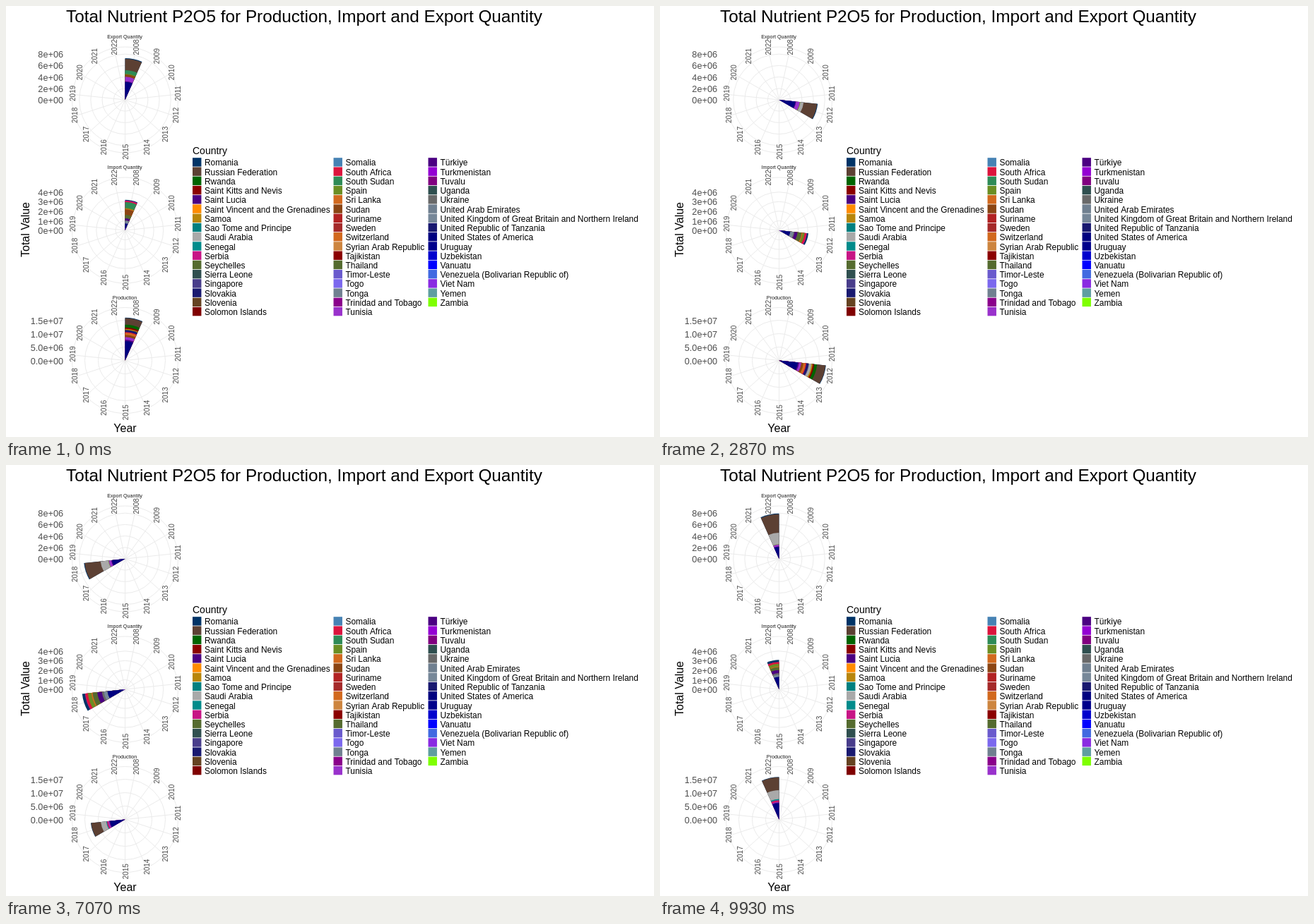
Animation, 917 px wide and 611 px high, one loop 10000 ms. Source, as an HTML page with a canvas:

```html
<!DOCTYPE html>
<html lang="en">
<head>
<meta charset="utf-8">
<title>Total Nutrient P2O5</title>
<style>
html, body { margin: 0; width: 100%; height: 100%; overflow: hidden; background: #fff; }
canvas { display: block; width: 917px; height: 611px; }
</style>
</head>
<body>
<canvas id="stage" width="917" height="611"></canvas>
<script>
const ctx = document.getElementById('stage').getContext('2d');
const LOOP = 10000, TICKS = 150;
const FIRST_YEAR = 2008, YEARS = 15, LAST = YEARS - 1;
const STEP = Math.PI * 2 / YEARS;
const CX = 168.5, RING = 75, KEY = 13.23;
const ARRIVAL = 4;
const GREY = '#4d4d4d';
const FONT = '"Liberation Sans", Arial, sans-serif';

const LEGEND = [
  { x: 264, rows: `Romania #003366|Russian Federation #5c4033|Rwanda darkgreen|Saint Kitts and Nevis darkred|Saint Lucia indigo|Saint Vincent and the Grenadines darkorange|Samoa darkgoldenrod|Sao Tome and Principe teal|Saudi Arabia darkgray|Senegal darkcyan|Serbia mediumvioletred|Seychelles darkolivegreen|Sierra Leone darkslategray|Singapore darkslateblue|Slovakia midnightblue|Slovenia #654321|Solomon Islands maroon` },
  { x: 463.5, rows: `Somalia steelblue|South Africa crimson|South Sudan seagreen|Spain olivedrab|Sri Lanka chocolate|Sudan saddlebrown|Suriname firebrick|Sweden brown|Switzerland chocolate|Syrian Arab Republic peru|Tajikistan darkred|Thailand darkolivegreen|Timor-Leste slateblue|Togo mediumslateblue|Tonga slategray|Trinidad and Tobago darkmagenta|Tunisia darkorchid` },
  { x: 597.5, rows: `Türkiye indigo|Turkmenistan darkviolet|Tuvalu purple|Uganda darkslategray|Ukraine dimgray|United Arab Emirates slategray|United Kingdom of Great Britain and Northern Ireland lightslategray|United Republic of Tanzania midnightblue|United States of America navy|Uruguay darkblue|Uzbekistan mediumblue|Vanuatu blue|Venezuela (Bolivarian Republic of) royalblue|Viet Nam blueviolet|Yemen cadetblue|Zambia chartreuse` }
];
const COLORS = {};
for (const col of LEGEND) {
  col.names = col.rows.split('|').map(row => {
    const cut = row.lastIndexOf(' ');
    const name = row.slice(0, cut);
    COLORS[name] = row.slice(cut + 1);
    return name;
  });
}

const USA = 'United States of America';
const UK = 'United Kingdom of Great Britain and Northern Ireland';

// size: key points of the bar length by year index.
// shares: [first year, last year]; a zero end means the country drops out or arrives midway.
const PANELS = [
  {
    title: 'Export Quantity', cy: 133, gap: 16.2, drop: 4,
    ticks: ['0e+00', '2e+06', '4e+06', '6e+06', '8e+06'],
    size: { 0: 59, 3: 61.5, 4: 55, 8: 53, 10: 58.5, 11: 66.5, 14: 64.2 },
    shares: {
      'Romania': [1, 1], 'Russian Federation': [16.5, 26], 'Saudi Arabia': [0, 16],
      'South Sudan': [5, 0], 'Spain': [1, 0.5], 'Sudan': [3.5, 0],
      'Tunisia': [6.5, 2.5], 'Türkiye': [1, 1], [USA]: [26, 16.5]
    }
  },
  {
    title: 'Import Quantity', cy: 318, gap: 13.55, drop: 4,
    ticks: ['0e+00', '1e+06', '2e+06', '3e+06', '4e+06'],
    size: { 0: 43.3, 2: 48.7, 4: 41.7, 8: 55.5, 9: 63, 12: 57, 14: 41.8 },
    shares: {
      'Romania': [1, 4], 'Serbia': [1, 0.5], 'South Africa': [1.5, 3], 'South Sudan': [8, 0],
      'Spain': [1.5, 5], 'Sri Lanka': [1, 1.5], 'Sudan': [8, 0], 'Thailand': [5, 5.5],
      'Türkiye': [3, 6], 'Ukraine': [0.5, 3], [UK]: [4, 4], [USA]: [7, 22], 'Viet Nam': [3, 2]
    }
  },
  {
    title: 'Production', cy: 502.5, gap: 19, drop: 5,
    ticks: ['0.0e+00', '5.0e+06', '1.0e+07', '1.5e+07'],
    size: { 0: 60.7, 2: 65.7, 4: 66.7, 5: 50, 8: 52, 10: 48.8, 12: 53.8, 14: 60.2 },
    shares: {
      'Romania': [0.7, 0.5], 'Russian Federation': [9.5, 17.5], 'Rwanda': [4, 0],
      'Saint Kitts and Nevis': [2, 0], 'Samoa': [1.7, 0], 'Saudi Arabia': [0, 12],
      'Senegal': [0, 1.5], 'Serbia': [0, 1.2], 'Slovakia': [3, 0], 'South Africa': [1, 1],
      'Sri Lanka': [3, 0], 'Sudan': [3, 0], 'Tunisia': [4, 1], 'Türkiye': [2, 1], [USA]: [28, 22]
    }
  }
];

const mix = (a, b, k) => a + (b - a) * k;

function text(str, x, y, size, color = '#000', align = 'left', turn = 0) {
  ctx.save();
  ctx.translate(x, y);
  ctx.rotate(turn);
  ctx.font = `${size}px ${FONT}`;
  ctx.textAlign = align;
  ctx.fillStyle = color;
  ctx.fillText(str, 0, size * 0.36);
  ctx.restore();
}

function sizeAt(points, year) {
  const keys = Object.keys(points).map(Number);
  const next = keys.find(k => k >= year);
  const prev = keys.findLast(k => k <= year);
  return next === prev ? points[next] : mix(points[prev], points[next], (year - prev) / (next - prev));
}

function shareAt([first, last], year, drop) {
  if (last === 0) return year < drop ? first : 0;
  if (first === 0 && year < ARRIVAL) return 0;
  return mix(first, last, year / LAST);
}

function spoke(panel, i, r) {
  const a = (i + 0.5) * STEP;
  return [CX + r * Math.sin(a), panel.cy - r * Math.cos(a)];
}

function drawGrid(panel) {
  ctx.strokeStyle = '#ebebeb';
  ctx.lineWidth = 1;
  ctx.beginPath();
  const rings = panel.ticks.map((t, i) => i * panel.gap).slice(1).concat(RING);
  for (const r of rings) {
    ctx.moveTo(CX + r, panel.cy);
    ctx.arc(CX, panel.cy, r, 0, Math.PI * 2);
  }
  for (let i = 0; i < YEARS; i++) {
    ctx.moveTo(CX, panel.cy);
    ctx.lineTo(...spoke(panel, i, RING));
  }
  ctx.stroke();
}

// Sectors are painted from the rim inwards, each covering the one before.
function drawBar(panel, year) {
  const parts = Object.entries(panel.shares).map(([name, ends]) => [name, shareAt(ends, year, panel.drop)]);
  const sum = parts.reduce((total, part) => total + part[1], 0);
  const scale = sizeAt(panel.size, year) / sum;
  const from = year * STEP - Math.PI / 2;
  let left = sum;
  for (const [name, share] of parts) {
    if (share === 0) continue;
    ctx.fillStyle = COLORS[name];
    ctx.beginPath();
    ctx.moveTo(CX, panel.cy);
    ctx.arc(CX, panel.cy, left * scale, from, from + STEP);
    ctx.fill();
    left -= share;
  }
}

function drawLabels(panel) {
  for (let i = 0; i < YEARS; i++) {
    const [x, y] = spoke(panel, i, RING);
    text(FIRST_YEAR + i, x + 0.7, y - 1.3, 10, GREY, 'center', -Math.PI / 2);
  }
  panel.ticks.forEach((t, i) => text(t, 81, panel.cy + 0.5 - i * panel.gap, 12.7, GREY, 'right'));
  text(panel.title, 168, panel.cy - 89.2, 7.2, '#1a1a1a', 'center');
}

function drawLegend() {
  text('Country', 264, 204.5, 14);
  for (const col of LEGEND) {
    col.names.forEach((name, i) => {
      const y = 215.2 + i * KEY;
      ctx.fillStyle = COLORS[name];
      ctx.fillRect(col.x, y, KEY - 0.8, KEY - 0.8);
      text(name, col.x + 17, y + KEY / 2 + 0.4, 11.9);
    });
  }
}

function draw(year) {
  ctx.fillStyle = '#fff';
  ctx.fillRect(0, 0, 917, 611);
  text('Total Nutrient P2O5 for Production, Import and Export Quantity', 85, 14.7, 24.3);
  for (const panel of PANELS) {
    drawGrid(panel);
    drawBar(panel, year);
    drawLabels(panel);
  }
  drawLegend();
  text('Year', CX, 598.5, 16, '#000', 'center');
  text('Total Value', 27.5, 317, 16, '#000', 'center', -Math.PI / 2);
}

// The years are spread evenly over the ticks, the last one on the final tick.
function startOf(year) {
  const tick = Math.round(year * (TICKS - 1) / LAST);
  return Math.round(tick * LOOP / TICKS / 10) * 10;
}

let shown = -1;
function play() {
  const t = performance.now() % LOOP;
  let year = LAST;
  while (startOf(year) > t) year--;
  if (year !== shown) draw(shown = year);
  requestAnimationFrame(play);
}
play();
</script>
</body>
</html>
```
